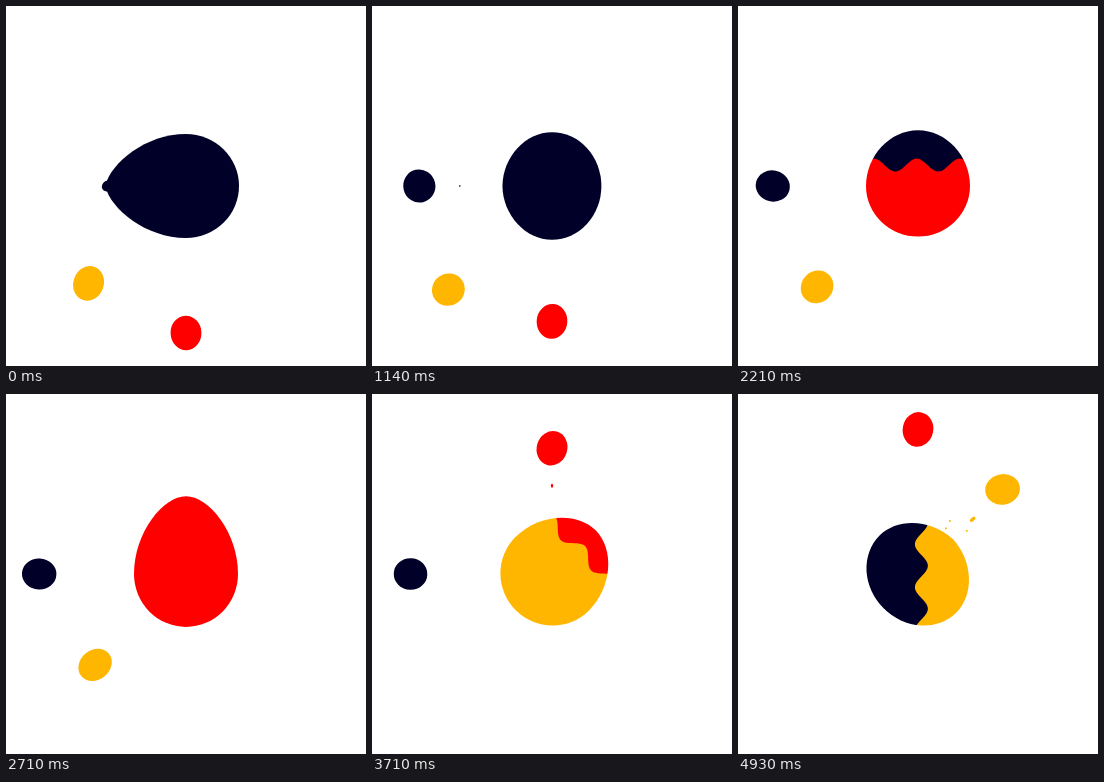
An HTML page with a canvas that plays this animation: 360x360 px, repeating every 5 s.

```html
<!DOCTYPE html>
<html lang="en">
<head>
<meta charset="utf-8">
<title>Drops</title>
<style>
  html, body { margin: 0; width: 100%; height: 100%; overflow: hidden; background: #fff; }
  canvas { display: block; }
</style>
</head>
<body>
<canvas id="stage" width="360" height="360"></canvas>
<script>
const ctx = document.getElementById('stage').getContext('2d');
const { PI, sin, cos, exp, min, max } = Math;
const LOOP = 5000, CYCLE = 5660;
const IMPACT = 4640, SWELL = CYCLE - 720, COVERED = 5450, ABSORBED = 4900;
const SNAP = 560, BEAD_END = 1250;

// Each drop crosses the body along its angle; start is its phase at time 0.
const navy = { color: '#000028', angle: 0, start: 0, wave: 19 };
const red = { color: '#ff0000', angle: -PI / 2, start: 2820, wave: 12 };
const orange = { color: '#ffb600', angle: -PI / 4, start: 1420, wave: 7 };
const drops = [red, orange, navy];

function rotated(angle, draw) {
  ctx.save();
  ctx.rotate(angle);
  draw();
  ctx.restore();
}

function oval(x, y, rx, ry, tilt = 0) {
  ctx.beginPath();
  ctx.ellipse(x, y, rx, ry, tilt, 0, 2 * PI);
  ctx.fill();
}

// The body swells towards its exit side before p = 0, then springs back.
function fillBody(p) {
  const rise = sin(PI / 2 * min(1, max(0, 1 + p / 720)));
  const pinch = min(1, max(0, .2 + p / 60)) * exp(-max(0, p) / 300);
  const spring = p < 0 ? 50 + 29 * rise : 52 + 27 * cos(p / 330) * exp(-p / 500);
  const front = spring + 8 * pinch;
  const back = p < 0 ? 50 + 3 * rise : min(53, spring);
  const side = 52 + .7 * max(0, 52 - spring);
  const c1 = .54 * front * (1 - .35 * pinch);
  const c2 = front * (1 - .32 * pinch);
  const h = 29 - .25 * max(0, front - 52) + 6 * pinch;
  const tip = 2.5 * pinch;
  ctx.beginPath();
  ctx.ellipse(0, 0, back, side, 0, PI / 2, PI * 1.5);
  ctx.bezierCurveTo(c1, -side, c2, -h, front, -tip);
  ctx.lineTo(front, tip);
  ctx.bezierCurveTo(c2, h, c1, side, 0, side);
  ctx.fill();
}

// The incoming colour sweeps across the body behind a wavy edge.
function fillSweep(drop, q) {
  const edge = -54 + 130 * sin(PI / 2 * (q - IMPACT) / 1000);
  ctx.beginPath();
  ctx.moveTo(-120, -120);
  for (let y = -120; y <= 120; y += 2)
    ctx.lineTo(edge + 6.5 * sin(2 * PI * (y + drop.wave) / 43), y);
  ctx.lineTo(-120, 120);
  ctx.fill();
}

function drawBody(t) {
  let base = navy, driver = navy;
  for (const drop of drops) {
    if (t + drop.start > SWELL) driver = drop;
    if (t + drop.start > COVERED) base = drop;
  }
  const q = t + driver.start, leaving = q > SWELL;
  ctx.fillStyle = base.color;
  rotated(driver.angle + (leaving ? 0 : PI), () => fillBody(leaving ? q - CYCLE : q));

  ctx.globalCompositeOperation = 'source-atop';
  for (const drop of drops) {
    const phase = t + drop.start;
    if (phase < IMPACT || phase > COVERED) continue;
    ctx.fillStyle = drop.color;
    rotated(drop.angle, () => fillSweep(drop, phase));
  }
  ctx.globalCompositeOperation = 'source-over';
}

// Slow climb out, accelerating fall back.
function flight(p) {
  const fall = exp((p - 4610) / 425);
  const size = 16.3 - 10.5 * exp(-((p / 250) ** 2));
  const stretch = .03 + .07 * cos(2 * PI * (p - 780) / 665) * exp(-p / 3000) + .13 * fall;
  return {
    x: 150 - 72 * exp(-p / 800) - 65 * fall,
    along: size * exp(stretch),
    across: size * exp(-stretch),
    tilt: cos((p - 570) / 280) * exp(-p / 1700)
  };
}

function drawNeck(x, p) {
  ctx.lineWidth = 1 + 8 * (1 - p / SNAP);
  ctx.beginPath();
  ctx.moveTo(45, 0);
  ctx.lineTo(x, 0);
  ctx.stroke();
}

// What is left of the neck after it snaps: one shrinking bead and a few specks.
function drawBeads(p) {
  const age = p - 670, size = 3.5 * exp(-age / 350);
  oval(93 - 18 * exp(-age / 150), 0, size, .4 + .4 * size);
  if (age < 90)
    for (const [x, y] of [[60, -15], [52, -12.5], [65, 4]]) oval(x, y, 1, 1);
}

function drawDrop(drop, t) {
  const q = t + drop.start, p = q % CYCLE;
  if (p > ABSORBED) return;
  ctx.fillStyle = ctx.strokeStyle = drop.color;
  rotated(drop.angle + (q < CYCLE ? PI : 0), () => {
    const { x, along, across, tilt } = flight(p);
    oval(x, 0, along, across, tilt);
    if (p < SNAP) drawNeck(x, p);
    else if (p < BEAD_END) drawBeads(p);
  });
}

function frame() {
  const t = performance.now() % LOOP;
  ctx.setTransform(1, 0, 0, 1, 0, 0);
  ctx.clearRect(0, 0, 360, 360);
  ctx.translate(180, 180);
  drawBody(t);
  for (const drop of drops) drawDrop(drop, t);
  requestAnimationFrame(frame);
}
frame();
</script>
</body>
</html>
```
